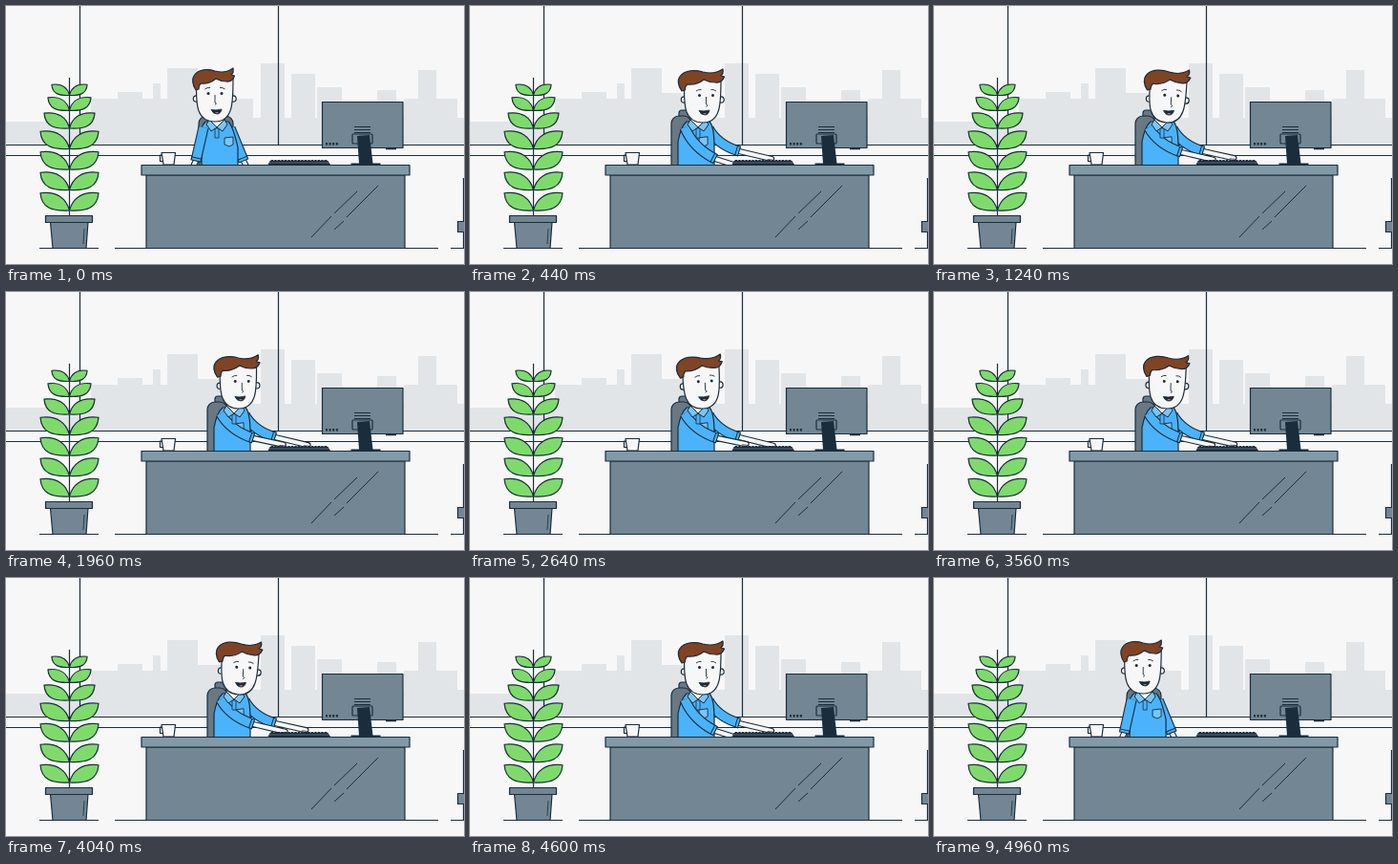
An HTML page with a canvas for the animation above (5160 ms loop, 480 by 270 pixels).

```html
<!DOCTYPE html>
<html lang="en">
<head>
<meta charset="utf-8">
<title>Office desk</title>
<style>
html, body { margin: 0; height: 100%; overflow: hidden; background: #f7f7f7; }
canvas { display: block; width: 480px; height: 270px; }
</style>
</head>
<body>
<canvas id="stage" width="480" height="270"></canvas>
<script>
const ctx = document.getElementById('stage').getContext('2d');
const LOOP = 5160, INK = '#1a2d3c', PAPER = '#f7f7f7', STEEL = '#728793', DESKTOP = '#8299a7',
  SHIRT = '#4ab3fb', TRIM = '#78c6fd', HAIR = '#804424', LEAF = '#7edb6b', CHAIR = '#667985';

function draw(d, fill, line = 1.2, ink = INK) {
  const path = new Path2D(d);
  if (fill) { ctx.fillStyle = fill; ctx.fill(path); }
  if (line) { ctx.lineWidth = line; ctx.strokeStyle = ink; ctx.stroke(path); }
}

function box(x, y, w, h, fill, line, radius = 0) {
  const path = new Path2D();
  path.roundRect(x, y, w, h, radius);
  draw(path, fill, line);
}

function dot(x, y, r, fill, line = 0) {
  box(x - r, y - r, 2 * r, 2 * r, fill, line, r);
}

// Runs paint with the origin moved, and optionally turned.
function at(x, y, paint, angle = 0) {
  ctx.save();
  ctx.translate(x, y);
  ctx.rotate(angle);
  paint();
  ctx.restore();
}

function ease(t, from, to) {
  const k = Math.min(1, Math.max(0, (t - from) / (to - from)));
  return k * k * (3 - 2 * k);
}

function city() {
  const tower = (x, top, w) => box(x, top, w, 145 - top, '#e2e5e7', 0);
  tower(0, 121, 201);
  tower(201, 117, 279);
  tower(89, 97, 112);
  tower(117, 90, 26);
  tower(154, 81, 8);
  tower(169, 65, 32);
  tower(201, 91, 39);
  tower(240, 97, 19);
  tower(267, 60, 25);
  tower(299, 71, 25);
  tower(326, 85, 26);
  tower(389, 88, 20);
  tower(417, 97, 56);
  tower(432, 67, 19);
  draw('M77.5 0V145M285.5 0V145M0 145.5H480M0 156.5H480');
}

function plant() {
  draw('M66.5 75V219');
  for (let i = 0, y = 214; i < 7; i++) {
    const size = Math.min(1, 1.39 - i * .13);
    for (const side of [-1, 1]) {
      const p = (x, up) => `${66.5 + side * 30.5 * size * x} ${y - 19 * size * up}`;
      draw(`M${p(0, 0)}C${p(.1, .65)} ${p(.42, 1.08)} ${p(1, .96)}C${p(.96, .15)} ${p(.6, -.06)} ${p(0, 0)}Z`, LEAF);
    }
    y -= 21.5 * size;
  }
  draw('M46.5 226H86L84 253.5H49Z', STEEL);
  box(41.5, 219.5, 49, 7, STEEL);
  draw('M82 233L81 249', null, .8);
}

function desk() {
  draw('M35 253.5H97M114 253.5H453M466 253.5H480');
  box(147, 177, 271, 76.5, STEEL);
  box(142, 166.5, 281, 10.5, DESKTOP);
  draw('M320 242L341 220M344 217L368 194M333 235L342 226M345 223L390 188'.replace(/M333.*/, 'M344 234L354 225M357 221L390 188'), null, 1);
  draw('M479.5 180V254');
  box(473.5, 225.5, 8, 11, STEEL);
  draw('M164.5 156H161.5V162.5H165');
  draw('M163 153.5H177.5L176 166H165Z', PAPER);
}

function monitor() {
  box(331.5, 100.5, 84.5, 48, STEEL);
  for (let i = 0; i < 3; i++) box(365, 126 + 3 * i, 17, 1, INK, 0);
  for (let i = 0; i < 4; i++) box(335 + 3.6 * i, 143, 2, 2.6, INK, 0);
  box(398, 148.5, 11, 1.8, INK, 0);
  box(363, 134, 21, 10, STEEL, 1.2, 1);
  draw('M368 136L381 135L384.5 165H370Z', INK, 0);
  box(361.5, 164.5, 31, 2, INK, 0);
}

function keyboard() {
  draw('M277 162H337L339.5 166H275Z', INK, .8);
  draw('M276 164H338', null, .7, STEEL);
  for (let x = 278; x < 337; x += 3.5) box(x, 161, 2, 1, INK, 0);
}

// The elbow sags more the further the arm reaches.
function arm(shoulder, cuff, hand, sag) {
  const [sx, sy] = shoulder, [cx, cy] = cuff, [hx, hy] = hand;
  const bx = (sx + cx) / 2 - 7 * sag, by = (sy + cy) / 2 + 5 * sag;
  const forearm = `M${cx} ${cy}L${hx} ${hy}`, sleeve = `M${sx} ${sy}Q${bx} ${by} ${cx} ${cy}`;
  ctx.lineCap = 'round';
  draw(forearm, null, 6.4);
  draw(forearm, null, 4.2, PAPER);
  draw(`M${hx - 4} ${hy + .6}L${hx + 2} ${hy + 1.2}`, null, .8);
  ctx.lineCap = 'butt';
  draw(sleeve, null, 11.2);
  draw(sleeve, null, 9, SHIRT);
  at(cx, cy, () => draw('M0 -5.5V5.5M-3 -5.5V5.5', null, 1), Math.atan2(cy - by, cx - bx));
}

function head(turn) {
  dot(-19.5, -21, 3.2, PAPER, 1.2);
  dot(19, -21, 3.2, PAPER, 1.2);
  draw('M-19.5 -32C-19.5 -17 -20 3 0 3C19 3 19 -17 19 -42H-16Z', PAPER);
  draw('M-4 -9.5Q1 -8.5 7 -10Q6 -5 2 -5Q-2 -5 -4 -9.5Z', INK, .8);
  draw('M0 -6.4Q2 -7.6 4 -6.4Q2 -5 0 -6.4Z', '#e5756f', 0);
  at(3.5 * turn, turn, () => {
    for (const x of [-7, 7]) dot(x, -26.5, 1.5, INK);
    draw('M-10.5 -31Q-8 -33 -5 -32.5M5 -32.5Q8 -33 10.5 -31', null, .9);
    draw('M0 -25V-17Q3 -16 0 -14.5', null, .9);
  });
  ctx.scale(1 + .1 * turn, 1);
  draw('M-20 -30C-24 -36 -24 -42 -22 -45C-17 -53 -6 -52 0 -50Q11 -47 19 -53Q20 -48 17 -46L20.5 -45Q18 -38 12 -39Q6 -39 1 -42Q-6 -36 -15 -37Q-17 -35 -17 -31Z', HAIR);
}

function man(turn, reach, beat) {
  const neck = 221 + 18 * turn, hip = neck + 3 - 5 * turn;
  const left = 202 + 9 * turn, width = 36 - 15 * turn;
  box(left + 8, 109, 12, 12, CHAIR, 1.2, 3);
  box(left, 115, width, 60, CHAIR, 1.2, 8);

  arm([neck + 14 - 3 * turn, 128], [249 + 33 * turn, 162 - 10 * turn],
    [251 + 65 * turn - 1.7 * beat, 166 - 6 * turn - .8 * beat], turn);
  draw(`M${neck - 12} 121Q${neck - 18} 126 ${hip - 19} 142V167H${hip + 19}V148Q${neck + 17} 126 ${neck + 12} 121Z`, SHIRT);
  at(229 + 11 * turn, 137, () => draw('M0 1L9 0V8L5 10L0 8Z', TRIM, .9), -.03 * turn);
  arm([neck - 14, 127], [199 + 58 * turn + 2 * reach, 162 - 2 * turn - 7 * reach],
    [197 + 79 * turn + 15 * reach + 1.5 * beat, 166 - 6 * reach + .8 * beat], turn);

  at(neck, 127, () => {
    draw('M-2 0V11H2V0', SHIRT, .8);
    draw('M-8 -10V-3L0 1L8 -3V-10Z', PAPER);
    for (const side of [-1, 1])
      draw(`M0 0L${side * 6} 4L${side * 11} -3L${side * 8} -8Z`, TRIM, 1);
  });
  at(219 + 25 * turn, 118 + turn, () => head(turn), beat * .05);
}

function frame(now) {
  const t = now % LOOP;
  const into = Math.min(t, 5040 - t);
  const turn = ease(into, 60, 440), reach = ease(into, 440, 600);
  const beat = reach * Math.cos((t - 1240) / 560 * 2 * Math.PI);
  ctx.fillStyle = PAPER;
  ctx.fillRect(0, 0, 480, 270);
  ctx.lineJoin = 'round';
  city();
  plant();
  man(turn, reach, beat);
  desk();
  monitor();
  keyboard();
  requestAnimationFrame(frame);
}
requestAnimationFrame(frame);
</script>
</body>
</html>
```
